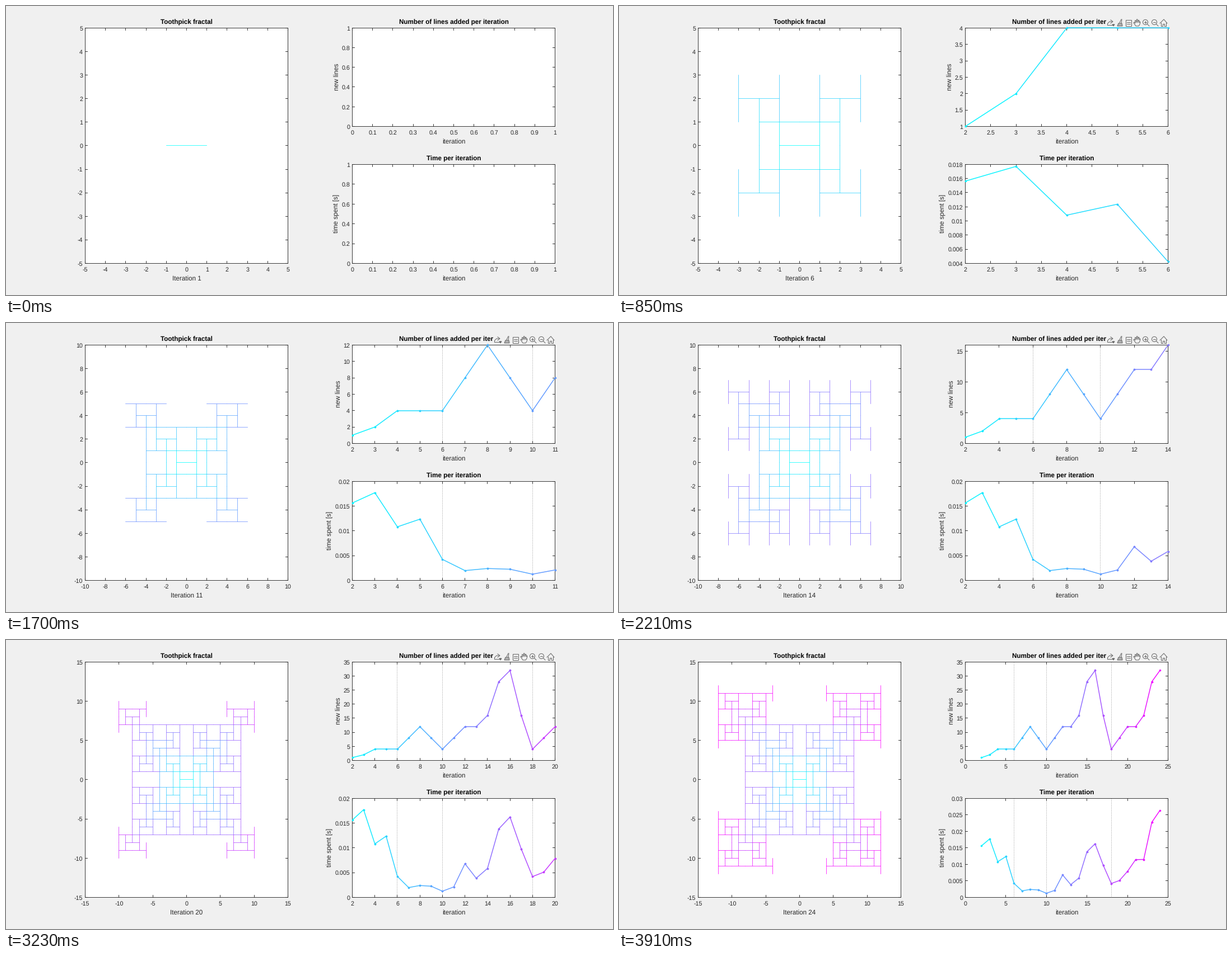
These frames come from a looping animation (1084 by 517 pixels, 4080 ms). A matplotlib script:

```python
import math

import matplotlib.pyplot as plt
from matplotlib.animation import FuncAnimation
from matplotlib.collections import LineCollection
from matplotlib.patches import Circle, Polygon, Rectangle

W, H = 1084, 517
STEPS = 24
PT = 0.72                      # points per pixel at 100 dpi
BACK, INK, ICON = "#f0f0f0", "#262626", "#666666"
TICK_FONT, LABEL_FONT = 10.67, 11.6

# seconds spent, iterations 2 to 24
TIMES = [.01564, .01772, .01082, .01237, .00424, .00198, .0024, .00225,
         .00125, .0021, .0068, .00387, .00585, .01383, .01625, .00978,
         .0042, .0051, .00788, .01144, .0115, .02278, .02637]

plt.rcParams["font.family"] = "Liberation Sans"
plt.rcParams["text.hinting"] = "none"
fig = plt.figure(figsize=(W / 100, H / 100), dpi=100, facecolor=BACK)
ax = fig.add_axes([0, 0, 1, 1])


def grow(stages):
    """Toothpick stages; each stick is (x, y, dx, dy) around its centre."""
    touched, result, fresh = {}, [], [(0, 0, 1, 0)]
    for _ in range(stages):
        result.append(fresh)
        for x, y, dx, dy in fresh:
            for k in (-1, 0, 1):
                p = (x + k * dx, y + k * dy)
                touched[p] = touched.get(p, 0) + 1
        fresh = [(x + k * dx, y + k * dy, dy, dx)
                 for x, y, dx, dy in fresh for k in (-1, 1)
                 if touched[x + k * dx, y + k * dy] == 1]
    return result


STAGES = grow(STEPS)
COUNTS = [len(s) for s in STAGES[:-1]]


def cool(t):
    return (t, 1 - t, 1)


def steps_from(span):
    """Ascending 1-2-5 steps, starting well below the span."""
    k = math.floor(math.log10(span)) - 2
    while True:
        for m in (1, 2, 5):
            yield m * 10.0 ** k
        k += 1


def limits(lo, hi, most):
    """Snap a data range to the finest step with at most `most` ticks."""
    for step in steps_from(hi - lo):
        a, b = math.floor(lo / step + 1e-6), math.ceil(hi / step - 1e-6)
        if b - a + 1 <= most:
            return a * step, b * step


def ticks(lo, hi, most):
    for step in steps_from(hi - lo):
        a, b = math.ceil(lo / step - 1e-6), math.floor(hi / step + 1e-6)
        if b - a + 1 <= most:
            return [i * step for i in range(a, b + 1)]


def segments(segs, color, width, cap="projecting", **kw):
    ax.add_collection(LineCollection(segs, colors=color, linewidths=width * PT,
                                     capstyle=cap, **kw), autolim=False)


def text(x, y, s, size=LABEL_FONT, ha="center", **kw):
    kw.setdefault("color", INK)
    ax.text(x + .5, y, s, fontsize=size * PT, ha=ha, va="baseline", **kw)


def label_width(s):
    return TICK_FONT * sum(.278 if c == "." else .556 for c in s)


class Panel:
    def __init__(self, left, top, right, bottom, title, xlabel, ylabel="", most=(11, 11)):
        self.box = left, top, right, bottom
        self.title, self.xlabel, self.ylabel, self.most = title, xlabel, ylabel, most

    def px(self, x):
        l, _, r, _ = self.box
        return l + (r - l) * (x - self.xlim[0]) / (self.xlim[1] - self.xlim[0])

    def py(self, y):
        _, t, _, b = self.box
        return b - (b - t) * (y - self.ylim[0]) / (self.ylim[1] - self.ylim[0])

    def draw(self, xlim, ylim, xlabel=None):
        self.xlim, self.ylim = xlim, ylim
        l, t, r, b = self.box
        mid = (l + r) / 2
        ax.add_patch(Rectangle((l, t), r - l, b - t, fc="white", lw=0, zorder=0))
        lines = [[(l, t), (r, t)], [(l, b), (r, b)], [(l, t), (l, b)], [(r, t), (r, b)]]
        for v in ticks(*xlim, self.most[0]):
            x = self.px(v)
            lines += [[(x, b), (x, b - 4)], [(x, t), (x, t + 4)]]
            text(x, b + 15, f"{v:g}", TICK_FONT)
        widest = 0
        for v in ticks(*ylim, self.most[1]):
            y, s = self.py(v), f"{v:g}"
            lines += [[(l, y), (l + 4, y)], [(r, y), (r - 4, y)]]
            text(l - 4.5, y + 4.7, s, TICK_FONT, "right")
            widest = max(widest, label_width(s))
        segments(lines, INK, .9, zorder=2)
        text(mid, t - 6, self.title, weight="bold", color="black")
        text(mid, b + 31, xlabel or self.xlabel)
        if self.ylabel:
            text(l - 10 - widest, (t + b) / 2, self.ylabel,
                 rotation=90, rotation_mode="anchor")

    def curve(self, n, values):
        """Segments from iteration 2 up to n, coloured by iteration."""
        for k in (6, 10, 18):
            if k < n:
                x = self.px(k)
                segments([[(x, self.box[1]), (x, self.box[3])]], "#8c8c8c", 1, "butt",
                         linestyles=[(0, (1, 2))], zorder=1)
        # data runs through pixel centres
        pts = [(self.px(k) + .5, self.py(v) + .5) for k, v in enumerate(values[:n - 1], 2)]
        for i, pair in enumerate(zip(pts, pts[1:]), 1):
            ax.plot(*zip(*pair), color=cool(i / 23), lw=1.5 * PT, marker="o",
                    ms=3.6 * PT, mew=0, clip_on=False, zorder=3)


fractal = Panel(141, 39, 503, 460, "Toothpick fractal", "")
added = Panel(618, 39, 980, 215, "Number of lines added per iteration",
              "iteration", "new lines", (11, 8))
spent = Panel(618, 283, 980, 460, "Time per iteration",
              "iteration", "time spent [s]", (11, 8))


def toolbar():
    def stroke(*pts):
        ax.plot(*zip(*pts), color=ICON, lw=PT, zorder=6)

    def shape(patch):
        patch.set(ec=ICON, lw=PT, zorder=6)
        ax.add_patch(patch)

    ax.add_patch(Rectangle((870, 22), 111, 16, fc=BACK, lw=0, zorder=5))
    # export
    stroke((872, 31), (872, 34), (881, 34))
    stroke((873, 31), (876, 28), (881, 28))
    stroke((878, 25), (882, 28), (878, 31))
    shape(Polygon([(881, 33), (885, 33), (883, 36)], fc=ICON))
    # brush
    stroke((897, 24), (894, 30))
    stroke((898, 24), (897, 31))
    shape(Polygon([(892, 31), (898, 31), (899, 36), (890, 36)], fc="#b0b0b0"))
    # data tips
    shape(Rectangle((905, 25), 10, 11, fill=False))
    stroke((907, 29), (913, 29))
    stroke((907, 32), (913, 32))
    # pan
    shape(Polygon([(923, 36), (919, 30), (920, 29), (922, 31), (921.5, 26),
                   (923, 26), (924, 30), (924.5, 24), (926, 24), (926.5, 30),
                   (927.5, 25.5), (929, 26), (929, 30), (930, 28), (931, 29),
                   (930, 33), (928, 36)], fill=False))
    # zoom in and out
    for x in (940, 956):
        shape(Circle((x, 29), 4.5, fill=False))
        stroke((x + 3.5, 32.5), (x + 7, 36))
        stroke((x - 2, 29), (x + 2, 29))
    stroke((940, 27), (940, 31))
    # home
    stroke((966, 31), (973, 24), (979, 31))
    stroke((968, 30), (968, 36), (971, 36), (971, 32), (974, 32),
           (974, 36), (977, 36), (977, 30))


def draw(frame):
    n = frame + 1
    ax.clear()
    ax.axis("off")
    # the small shift makes half-pixel rows snap upwards
    ax.set_xlim(0, W)
    ax.set_ylim(H + .1, .1)

    reach = 5 * (n // 10 + 1)
    fractal.draw((-reach, reach), (-reach, reach), f"Iteration {n}")
    for i, stage in enumerate(STAGES[:n]):
        segments([[(fractal.px(x - dx), fractal.py(y - dy)),
                   (fractal.px(x + dx), fractal.py(y + dy))]
                  for x, y, dx, dy in stage], cool(i / 23), .75, zorder=3)

    for panel, values in ((added, COUNTS), (spent, TIMES)):
        if n < 3:
            panel.draw((0, 1), (0, 1))
            continue
        seen = values[:n - 1]
        panel.draw(limits(2, n, 11), limits(min(seen), max(seen), 9))
        panel.curve(n, values)
    if n >= 3:
        toolbar()
    return []


anim = FuncAnimation(fig, draw, frames=STEPS, interval=170, repeat=True)
plt.show()
```
